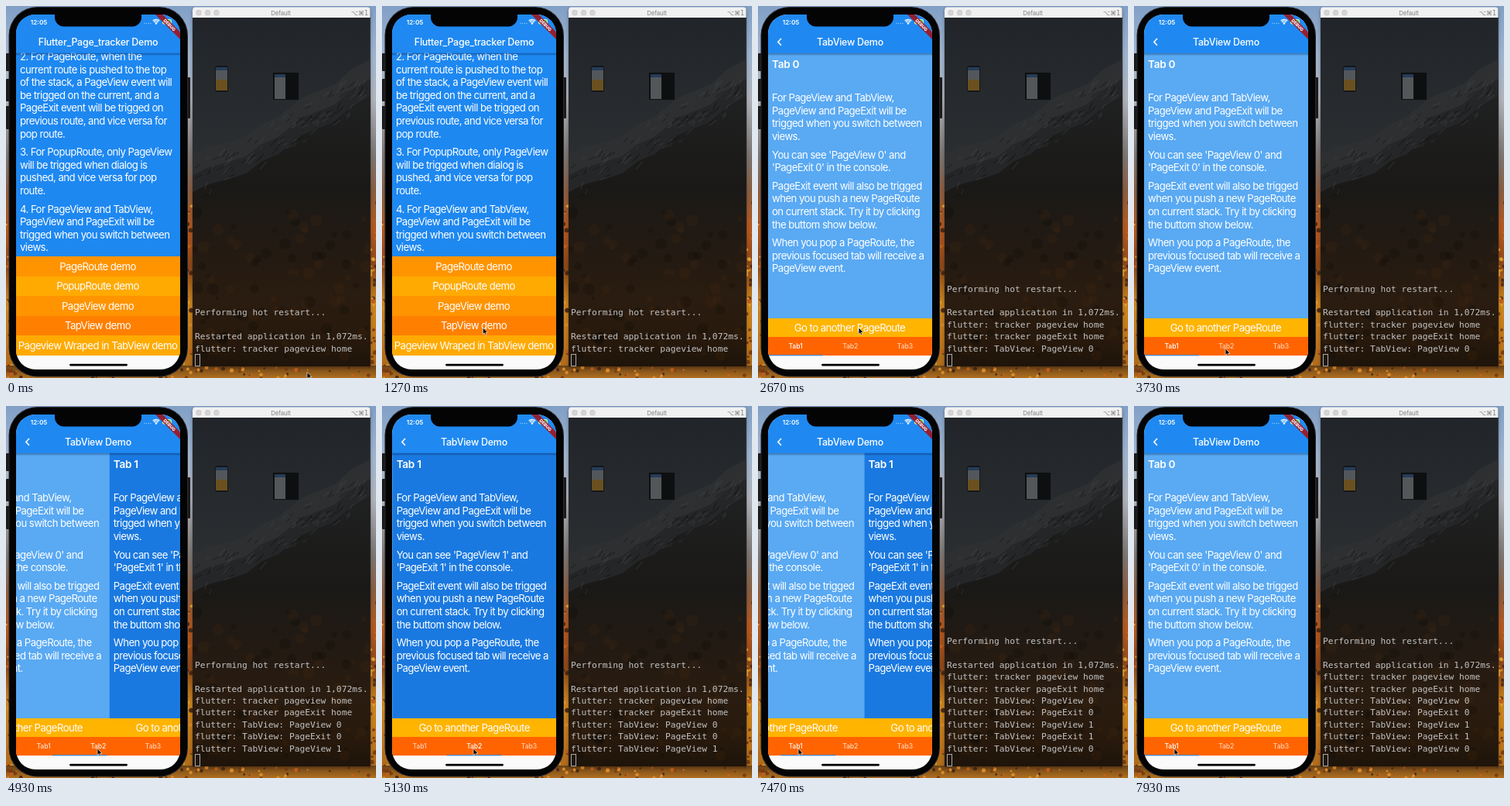
Recreate the animation shown at these times as an HTML page with a canvas. Size 478x480 px, loop 8 s.

```html
<!DOCTYPE html>
<html lang="en">
<head>
<meta charset="utf-8">
<title>Page tracker demo</title>
<style>
  html, body { margin: 0; width: 100%; height: 100%; overflow: hidden; background: #000; }
  canvas { display: block; width: 478px; height: 480px; }
</style>
</head>
<body>
<canvas id="stage"></canvas>
<script>
const LOOP = 8000, W = 478, H = 480;
const SCREEN = { x: 13, y: 11, w: 212, h: 458 };
const PUSH = 1730, TO_TAB2 = 4853, TO_TAB1 = 7369;
const SANS = 'Inter, Roboto, sans-serif';
const MONO = '"DejaVu Sans Mono", monospace';

const canvas = document.getElementById('stage');
const ctx = canvas.getContext('2d');
const dpr = window.devicePixelRatio || 1;
canvas.width = W * dpr;
canvas.height = H * dpr;

// ---------- helpers ----------
const clamp = v => Math.min(1, Math.max(0, v));
const smooth = u => u * u * (3 - 2 * u);

function bezier(x1, y1, x2, y2) {
  const at = (a, b, s) => 3 * (1 - s) ** 2 * s * a + 3 * (1 - s) * s * s * b + s ** 3;
  return x => {
    if (x <= 0) return 0;
    if (x >= 1) return 1;
    let lo = 0, hi = 1;
    for (let i = 0; i < 24; i++) {
      const mid = (lo + hi) / 2;
      if (at(x1, x2, mid) < x) lo = mid; else hi = mid;
    }
    return at(y1, y2, (lo + hi) / 2);
  };
}
const ease = bezier(.25, .1, .25, 1);
const routeEase = bezier(.35, .91, .33, .97);

function rect(x, y, w, h, fill) {
  ctx.fillStyle = fill;
  ctx.fillRect(x, y, w, h);
}
function round(x, y, w, h, r, fill) {
  ctx.beginPath();
  ctx.roundRect(x, y, w, h, r);
  ctx.fillStyle = fill;
  ctx.fill();
}
function circle(x, y, r, fill) {
  ctx.beginPath();
  ctx.arc(x, y, r, 0, 7);
  ctx.fillStyle = fill;
  ctx.fill();
}
function poly(points, fill) {
  ctx.beginPath();
  points.forEach(([x, y]) => ctx.lineTo(x, y));
  ctx.closePath();
  ctx.fillStyle = fill;
  ctx.fill();
}
function gradient(x0, y0, x1, y1, ...stops) {
  const g = ctx.createLinearGradient(x0, y0, x1, y1);
  stops.forEach(([at, color]) => g.addColorStop(at, color));
  return g;
}
function text(str, x, y, font, { color = '#fff', align = 'left', spacing = 0 } = {}) {
  ctx.font = font;
  ctx.fillStyle = color;
  ctx.textAlign = align;
  ctx.letterSpacing = spacing + 'px';
  ctx.fillText(str, x, y);
}
function random(seed) {
  return () => (seed = seed * 16807 % 2147483647) / 2147483647;
}
function group(draw) {
  ctx.save();
  draw();
  ctx.restore();
}

// ---------- desktop ----------
function drawDesktop() {
  rect(0, 0, W, H, gradient(0, 0, 0, H,
    [0, '#819fc6'], [.13, '#9fb4cf'], [.25, '#b0b3ba'], [.4, '#7b7673'], [.5, '#8a5d40'],
    [.6, '#b5581e'], [.7, '#8c4719'], [.8, '#cc861f'], [.9, '#bf761b'], [1, '#a3661c']));
  const rnd = random(77);
  const tones = ['#d98a2a', '#7a3d14', '#4a2a15', '#c0601c', '#e0a035'];
  for (let i = 0; i < 130; i++) {
    const x = [0, 226, 468][i % 3] + rnd() * 14;
    circle(x, 250 + rnd() * 225, 1 + rnd() * 2, tones[Math.floor(rnd() * 5)]);
  }
  rect(0, 464, W, 16, gradient(0, 464, 0, 480, [0, '#6b4116'], [1, '#b0701f']));
  for (let i = 0; i < 90; i++) {
    circle(rnd() * W, 466 + rnd() * 14, .8 + rnd() * 1.8, tones[i % 4]);
  }
}

// ---------- terminal ----------
const LOG = [
  [0, 'Performing hot restart...'],
  [0, ''],
  [0, 'Restarted application in 1,072ms.'],
  [0, 'flutter: tracker pageview home'],
  [1700, 'flutter: tracker pageExit home'],
  [1700, 'flutter: TabView: PageView 0'],
  [4800, 'flutter: TabView: PageExit 0'],
  [4800, 'flutter: TabView: PageView 1'],
  [7320, 'flutter: TabView: PageExit 1'],
  [7320, 'flutter: TabView: PageView 0'],
];

const RIDGE = [[241, 192], [262, 182], [285, 176], [310, 168], [331, 152], [352, 143],
               [381, 119], [405, 109], [425, 101], [443, 84], [471, 68]];

function drawMountains() {
  rect(241, 15, 230, 451, gradient(0, 15, 0, 190, [0, '#212529'], [1, '#2b2e31']));
  const below = (dy, fill) => poly([...RIDGE.map(([x, y]) => [x, y + dy]), [471, 466], [241, 466]], fill);
  below(0, '#2d2f31');
  below(26, '#252628');
  below(48, gradient(0, 110, 0, 466,
    [0, '#202122'], [.35, '#1a1917'], [.55, '#221a13'], [.75, '#2a1c10'], [.9, '#27190c'], [1, '#1e140a']));

  const rnd = random(31);
  ctx.lineWidth = 1.2;
  for (let i = 0; i < 110; i++) {
    const x = 250 + rnd() * 221;
    const y = 206 - (x - 241) * .56 + rnd() * 50;
    ctx.strokeStyle = i % 2 ? 'rgba(85,87,90,.3)' : 'rgba(10,10,12,.35)';
    ctx.beginPath();
    ctx.moveTo(x, y);
    ctx.lineTo(x - 3 - rnd() * 7, y + 3 + rnd() * 7);
    ctx.stroke();
  }
  for (let i = 0; i < 90; i++) {
    const tone = i % 2 ? 'rgba(80,46,18,.16)' : 'rgba(8,6,4,.2)';
    circle(241 + rnd() * 230, 265 + rnd() * 195, 2 + rnd() * 6, tone);
  }
}

function drawThumbnails() {
  round(270, 77, 17, 34, 2, '#15171a');
  rect(271, 79, 15, 4, '#263c58');
  rect(271, 83, 15, 12, '#53575b');
  rect(271, 95, 15, 14, '#6a501f');
  rect(345, 86, 33, 35, '#0e0f10');
  rect(347, 88, 14, 32, '#54575a');
  rect(347, 88, 14, 4, '#263c58');
}

function drawTerminal(t) {
  group(() => {
    ctx.shadowColor = 'rgba(0,0,0,.35)';
    ctx.shadowBlur = 4;
    ctx.shadowOffsetY = 1;
    round(241, 2, 229.5, 463, [4, 4, 0, 0], '#1c1e20');
  });
  group(() => {
    ctx.beginPath();
    ctx.rect(241, 15, 229.5, 450);
    ctx.clip();
    drawMountains();
    drawThumbnails();
  });
  round(241, 1.5, 229.5, 13.5, [4, 4, 0, 0], '#f1f1f1');
  for (const x of [249, 260.5, 272]) {
    circle(x, 8.7, 3.6, '#c4c4c6');
    circle(x, 8.7, 3, '#d5d5d7');
  }
  text('Default', 355, 11.8, '7.7px ' + SANS, { color: '#808080', align: 'center', spacing: -.1 });
  text('⌥⌘1', 468, 12, '8px "DejaVu Sans", sans-serif', { color: '#808080', align: 'right' });

  const lines = LOG.filter(([at]) => t >= at);
  lines.forEach(([, line], i) => {
    const y = 445.5 - (lines.length - 1 - i) * 15.4;
    text(line, 244, y, '11.25px ' + MONO, { color: '#c3c3c3' });
  });
  ctx.strokeStyle = '#a8a8a8';
  ctx.lineWidth = 1;
  ctx.strokeRect(244.5, 449.5, 6, 15);
}

// ---------- phone ----------
const BODY_FONT = '13.2px ' + SANS;
const TIGHT = -.56;
const HOME_TEXT = [
  ['2. For PageRoute, when the', 'current route is pushed to the top', 'of the stack, a PageView event will',
   'be trigged on the current, and a', 'PageExit event will be trigged on', 'previous route, and vice versa for', 'pop route.'],
  ['3. For PopupRoute, only PageView', 'will be trigged when dialog is', 'pushed, and vice versa for pop', 'route.'],
  ['4. For PageView and TabView,', 'PageView and PageExit will be', 'trigged when you switch between', 'views.'],
];
const tabText = n => [
  ['For PageView and TabView,', 'PageView and PageExit will be', 'trigged when you switch between', 'views.'],
  [`You can see 'PageView ${n}' and`, `'PageExit ${n}' in the console.`],
  ['PageExit event will also be trigged', 'when you push a new PageRoute', 'on current stack. Try it by clicking', 'the buttom show below.'],
  ['When you pop a PageRoute, the', 'previous focused tab will receive a', 'PageView event.'],
];
const MENU = [
  ['PageRoute demo', '#ff9400'], ['PopupRoute demo', '#ffaa00'], ['PageView demo', '#ff9400'],
  ['TapView demo', '#ff8000'], ['Pageview Wraped in TabView demo', '#ffaa00'],
];

function paragraphs(list, x, y) {
  for (const lines of list) {
    for (const line of lines) {
      text(line, x, y, BODY_FONT, { spacing: TIGHT });
      y += 16.6;
    }
    y += 7;
  }
}
function button(label, x, y, h, fill) {
  rect(x, y, 212.5, h, fill);
  text(label, x + 105.5, y + h / 2 + 4.9, BODY_FONT, { align: 'center', spacing: TIGHT });
}
function header(title) {
  rect(13, 60.5, 212, 4, gradient(0, 60.5, 0, 64.5, [0, 'rgba(0,20,60,.4)'], [1, 'rgba(0,20,60,0)']));
  rect(13, 11, 212, 49.7, '#1f89f1');
  text(title, 119, 50.9, '500 12.4px ' + SANS, { align: 'center', spacing: -.22 });
}

function drawHome() {
  rect(13, 11, 212, 459, '#fafafa');
  rect(13, 11, 212, 313, '#1e88f1');
  paragraphs(HOME_TEXT, 18, 69.9);
  const edge = i => Math.round(323 + i * 25.6);
  MENU.forEach(([label, fill], i) => button(label, 13, edge(i), edge(i + 1) - edge(i), fill));
  header('Flutter_Page_tracker Demo');
}

function drawTabPage(n, x) {
  rect(x, 60, 212.5, 343, n ? '#1a79e0' : '#59a9f3');
  text('Tab ' + n, x + 5, 79.9, '600 13.6px ' + SANS, { spacing: -.3 });
  paragraphs(tabText(n), x + 5, 123.2);
  button('Go to another PageRoute', x, 403, 24, '#ffb400');
}

// 0 shows the first tab, 1 the second
const tabPosition = t => ease((t - TO_TAB2) / 300) - ease((t - TO_TAB1) / 300);

function drawTabs(t) {
  const page = tabPosition(t), marker = tabPosition(t + 38);
  rect(13, 11, 212, 459, '#fafafa');
  for (const n of [0, 1]) {
    const offset = (n - page) * 212;
    if (Math.abs(offset) < 212) drawTabPage(n, 13 + offset);
  }
  rect(13, 427, 212, 24, '#ff6400');
  for (let i = 0; i < 3; i++) {
    const alpha = .7 + .3 * clamp(1 - Math.abs(i - marker));
    text('Tab' + (i + 1), 48.5 + i * 70.7, 442, '500 8.6px ' + SANS,
      { align: 'center', color: `rgba(255,255,255,${alpha})`, spacing: -.1 });
  }
  rect(13 + marker * 70.7, 450, 70.7, 1.3, '#4a86c4');
  header('TabView Demo');
  ctx.strokeStyle = '#fff';
  ctx.lineWidth = 1.6;
  ctx.beginPath();
  ctx.moveTo(30, 42);
  ctx.lineTo(25.8, 46.4);
  ctx.lineTo(30, 50.8);
  ctx.stroke();
}

function drawStatusBar() {
  text('12:05', 42.5, 23.7, '600 8.1px ' + SANS, { align: 'center' });
  for (let i = 0; i < 4; i++) circle(179 + i * 2.6, 22.3, .6, 'rgba(255,255,255,.7)');
  ctx.strokeStyle = '#fff';
  ctx.lineWidth = 1.3;
  for (const r of [2.2, 4.2, 6.2]) {
    ctx.beginPath();
    ctx.arc(194, 23.5, r, -Math.PI * .75, -Math.PI * .25);
    ctx.stroke();
  }
  circle(194, 23, .9, '#fff');
  round(202, 17, 12, 6.4, 1.6, '#d5ecd9');
  round(203, 18, 10, 4.4, 1, '#4cd964');
  group(() => {
    ctx.translate(211.4, 24.6);
    ctx.rotate(Math.PI / 4);
    rect(-32, -3.4, 64, 6.8, 'rgba(160,22,30,.9)');
    text('DEBUG', 0, 2.1, '800 5.6px ' + SANS, { align: 'center' });
  });
}

function drawPhone(t) {
  for (const [x, y, h] of [[0, 61, 23], [0, 94, 29], [0, 129, 30], [233, 92, 53]]) round(x, y, 5, h, 1, '#1b1b1d');
  round(3.5, 1, 231.5, 477.5, 37, '#29292b');
  round(4.5, 2, 229.5, 475.5, 36, '#040405');
  group(() => {
    const { x, y, w, h } = SCREEN;
    ctx.beginPath();
    ctx.roundRect(x, y, w, h, 25);
    ctx.clip();
    const p = routeEase((t - PUSH) / 400);
    if (p < 1) group(() => {
      ctx.translate(-w / 3 * p, 0);
      drawHome();
    });
    if (p > 0) group(() => {
      ctx.translate(w * (1 - p), 0);
      if (p < 1) rect(x - 11, y, 11, h, gradient(x - 11, 0, x, 0, [0, 'rgba(0,0,0,0)'], [1, 'rgba(0,0,0,.25)']));
      ctx.beginPath();
      ctx.rect(x, y, w, h);
      ctx.clip();
      drawTabs(t);
    });
    drawStatusBar();
    round(82, 461.7, 75, 2.8, 1.4, '#000');
  });
  round(63, 8, 112, 18.5, [0, 0, 12, 12], '#040405');
}

// ---------- pointer ----------
const POINTER = [
  [70, 389, 472.5], [1300, 130, 415], [2700, 130, 415], [3600, 118, 442],
  [5710, 118, 442], [6730, 52, 442],
];

function drawPointer(t) {
  const next = POINTER.findIndex(([at]) => at > t);
  const b = POINTER.at(next), a = next > 0 ? POINTER[next - 1] : b;
  const u = a === b ? 0 : smooth((t - a[0]) / (b[0] - a[0]));
  group(() => {
    ctx.translate(a[1] + (b[1] - a[1]) * u, a[2] + (b[2] - a[2]) * u);
    poly([[0, 0], [0, 8.4], [1.9, 6.7], [3.2, 9.6], [4.6, 9], [3.4, 6.2], [6, 6]], '#000');
    ctx.strokeStyle = 'rgba(255,255,255,.9)';
    ctx.lineWidth = .7;
    ctx.stroke();
  });
}

function frame(now) {
  const t = now % LOOP;
  ctx.setTransform(dpr, 0, 0, dpr, 0, 0);
  drawDesktop();
  drawTerminal(t);
  drawPhone(t);
  drawPointer(t);
  requestAnimationFrame(() => frame(performance.now() - start));
}
const start = performance.now();
frame(0);
</script>
</body>
</html>
```
